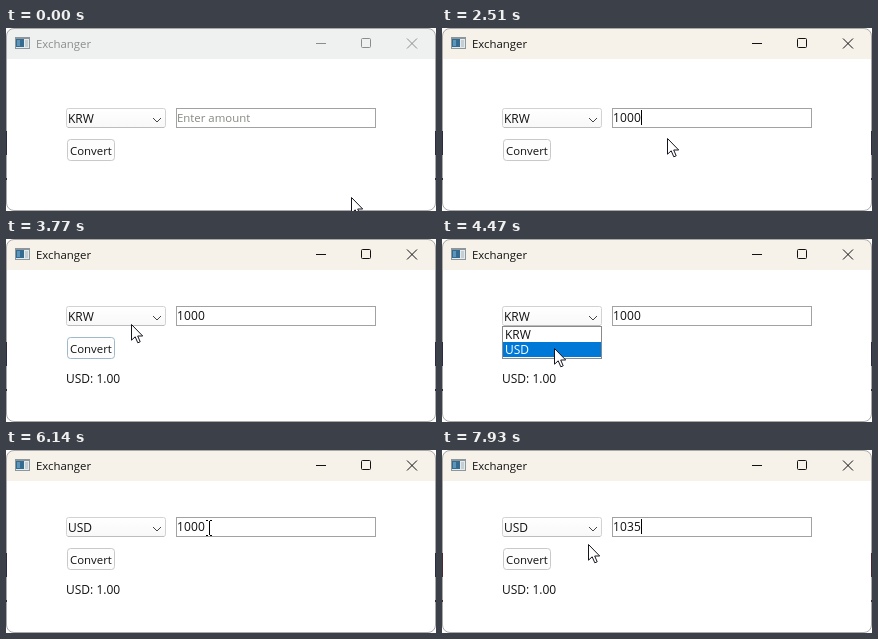
An HTML page for the animation above (8000 ms loop, 430x183 px).

```html
<!DOCTYPE html>
<html lang="en">
<head>
<meta charset="utf-8">
<title>Exchanger</title>
<style>
  html, body { margin: 0; width: 100%; height: 100%; overflow: hidden; background: #fff; }
  svg { display: block; width: 430px; height: 183px; }
  text { font: 12px "Open Sans", "Noto Sans", sans-serif; fill: #111; white-space: pre; }
  .word { font-size: 11.4px; }
  .crisp { shape-rendering: crispEdges; }
</style>
</head>
<body>
<svg viewBox="0 0 430 183">
  <defs>
    <linearGradient id="face" x2="0" y2="1">
      <stop offset="0" stop-color="#fff"/><stop offset="1" stop-color="#f8f8f8"/>
    </linearGradient>
    <clipPath id="frame"><rect width="430" height="183" rx="8"/></clipPath>
  </defs>

  <g clip-path="url(#frame)">
    <rect width="430" height="183" fill="#fff"/>
    <rect id="bar" width="430" height="31"/>
  </g>
  <rect x=".5" y=".5" width="429" height="182" rx="7.5" fill="none" stroke="#a9a9a9"/>
  <path id="edge" class="crisp" d="M.5 103V127M429.5 103V127M.5 150V152M429.5 150V152"/>

  <g class="crisp">
    <rect x="9" y="9" width="15" height="12" fill="#8d969b"/>
    <rect x="10" y="11" width="13" height="9" fill="#e4ebee"/>
    <rect x="10" y="11" width="8" height="8" fill="#356b91"/>
    <rect x="11" y="12" width="3" height="6" fill="#5c95b8"/>
    <rect x="19" y="12" width="3" height="7" fill="#c5ced2"/>
  </g>
  <text id="title" class="word" x="30" y="20">Exchanger</text>
  <g id="buttons" fill="none">
    <path d="M310 15.5H320"/>
    <rect x="355.5" y="10.5" width="9" height="9" rx="1"/>
    <path d="M401 10.5L411 20.5M411 10.5L401 20.5"/>
  </g>

  <g id="form">
    <rect x="60.5" y="80.5" width="99" height="19" rx="2" fill="url(#face)" stroke="#d2d2d2"/>
    <path d="M62 99.5H158" stroke="#bdbdbd"/>
    <path d="M147 90L151 94L155 90" fill="none" stroke="#444"/>
    <rect id="focus" class="crisp" x="62.5" y="82.5" width="80" height="15" fill="none" stroke="#000" stroke-dasharray="1 1"/>
    <text id="currency" x="62" y="95"></text>

    <rect class="crisp" x="170.5" y="80.5" width="199" height="19" fill="#fff" stroke="#a2a2a2"/>
    <text id="hint" class="word" x="171" y="94" style="fill:#858980">Enter amount</text>
    <g id="digits"></g>
    <rect id="caret" class="crisp" y="82" width="1" height="15" fill="#000"/>

    <rect id="button" x="61.5" y="111.5" width="47" height="21" rx="3" fill="#fdfdfd"/>
    <text class="word" x="64" y="127">Convert</text>
    <text id="result" x="60" y="157">USD: 1.00</text>

    <g id="popup">
      <rect class="crisp" x="60.5" y="100.5" width="99" height="32" fill="#fff" stroke="#8a8a8a"/>
      <rect id="hover" class="crisp" x="61" width="98" height="15" fill="#0078d7"/>
      <text id="item0" x="63" y="113">KRW</text>
      <text id="item1" x="63" y="128">USD</text>
    </g>
  </g>

  <g id="pointer">
    <path id="arrow" d="M.5 .5V16.2L4.2 12.8L6.8 18.8L9.2 17.8L6.7 12H11.7Z" fill="#fff" stroke="#15151f"/>
    <path id="beam" class="crisp" d="M-3 -7.5H-1M1 -7.5H3M.5 -7V7M-3 7.5H-1M1 7.5H3" fill="none" stroke="#000"/>
  </g>
</svg>

<script>
const LOOP = 8000;
const ui = {};
document.querySelectorAll('[id]').forEach(el => ui[el.id] = el);

const DIGIT = 7, FIELD = 171;
const RESULT_AT = 3210, OPEN_AT = 4120, PICK_AT = 4540;
const DRAG_FROM = 6140, DRAG_TO = 6490;

// Pointer stops: time, x, y
const path = [
  [0, 345, 169], [70, 345, 169], [340, 302, 128], [700, 257, 91],
  [2160, 257, 91], [2510, 225, 110], [2950, 96, 122], [3280, 93, 121],
  [3770, 125, 85], [3980, 143, 80], [4150, 141, 81], [4450, 112, 109],
  [4700, 112, 109], [5230, 94, 122], [5860, 203, 78], [6140, 203, 78],
  [6490, 168, 79], [6770, 154, 82], [6900, 150, 88], [7160, 146, 94]
];

// Field contents: time, text
const typed = [
  [0, ''], [1460, '1'], [1600, '10'], [1810, '100'], [2020, '1000'],
  [7510, '10'], [7720, '103'], [7930, '1035']
];

const within = (t, a, b) => t >= a && t < b;
const show = (el, on) => el.style.display = on ? '' : 'none';
const set = (el, attrs) => { for (const k in attrs) el.setAttribute(k, attrs[k]); };

function pointerAt(t) {
  const i = path.findIndex(p => p[0] > t);
  if (i < 0) return path[path.length - 1].slice(1);
  const [t0, x0, y0] = path[i - 1], [t1, x1, y1] = path[i];
  const u = (t - t0) / (t1 - t0), e = u * u * (3 - 2 * u);
  return [Math.round(x0 + (x1 - x0) * e), Math.round(y0 + (y1 - y0) * e)];
}

function drawField(t, x) {
  const [keyAt, value] = typed.filter(k => k[0] <= t).pop();
  let from = value.length;
  if (within(t, DRAG_FROM, 7510)) {
    from = t >= DRAG_TO ? 0 : Math.max(0, Math.min(4, Math.round((x - FIELD) / DIGIT)));
  }
  const end = FIELD + value.length * DIGIT, start = FIELD + from * DIGIT;
  const mark = start < end
    ? `<rect class="crisp" x="${start}" y="82" width="${end - start}" height="15" fill="#0078d7"/>` : '';
  ui.digits.innerHTML = mark + [...value].map((c, i) =>
    `<text x="${FIELD + i * DIGIT}" y="94"${i >= from ? ' style="fill:#fff"' : ''}>${c}</text>`).join('');

  const since = t - Math.max(keyAt, 790);
  const focused = within(t, 790, 3000) || t >= 7510;
  show(ui.caret, focused && since % 1060 < 530);
  set(ui.caret, { x: value ? end : FIELD });
  show(ui.hint, !value);
}

function draw(t) {
  const [x, y] = pointerAt(t);
  const active = t >= 790, done = t >= RESULT_AT;
  const ink = active ? '#111' : '#8b8d8d';

  set(ui.bar, { fill: active ? '#f6f2ea' : '#eff1f1' });
  ui.title.style.fill = ink;
  set(ui.buttons, { stroke: ink });
  set(ui.edge, { stroke: within(t, 4750, 5860) || t >= 7510 ? '#4b2830' : '#2b2b43' });

  set(ui.form, { transform: `translate(0 ${done ? -13 : 0})` });
  show(ui.result, done);
  ui.currency.textContent = t < PICK_AT ? 'KRW' : 'USD';
  show(ui.focus, within(t, PICK_AT, DRAG_FROM));
  set(ui.button, { stroke: within(t, 3000, OPEN_AT) ? '#9db9cb' : '#c9c9c9' });
  drawField(t, x);

  const row = y > 102 ? 1 : 0;
  show(ui.popup, within(t, OPEN_AT, PICK_AT));
  set(ui.hover, { y: 101 + row * 15 });
  [ui.item0, ui.item1].forEach((el, i) => el.style.fill = i === row ? '#fff' : '#111');

  const top = done ? 67 : 80;
  const inField = x >= 170 && x < 370 && y >= top && y < top + 20;
  const beam = inField || within(t, DRAG_FROM, DRAG_TO);
  show(ui.beam, beam);
  show(ui.arrow, !beam);
  set(ui.pointer, { transform: `translate(${x} ${y})` });
}

const begin = performance.now();
function tick() {
  draw((performance.now() - begin) % LOOP);
  requestAnimationFrame(tick);
}
draw(0);
tick();
</script>
</body>
</html>
```
